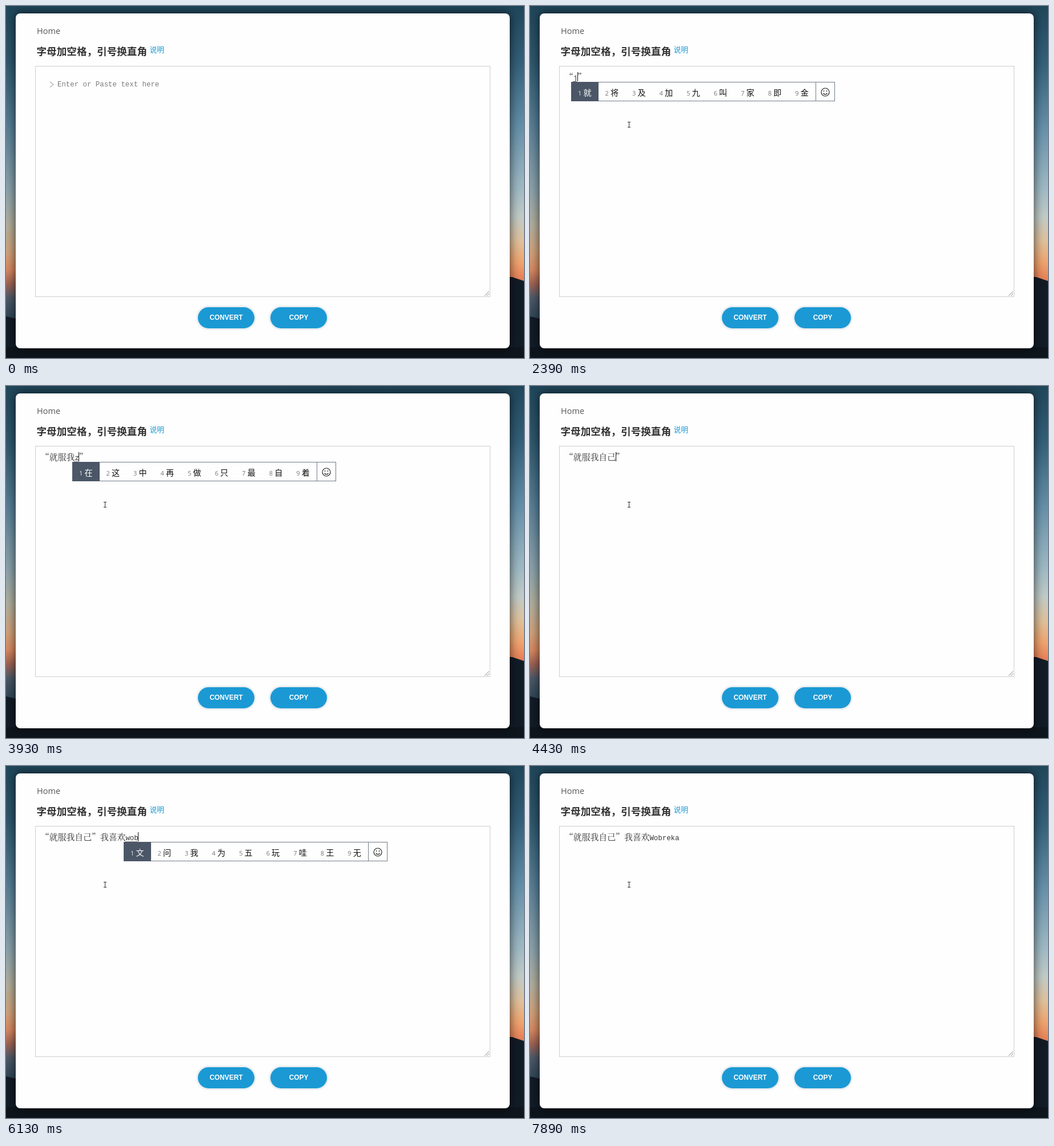
These frames come from a looping animation (907x617 px, 8000 ms). An HTML page:

```html
<!DOCTYPE html>
<html lang="zh-CN">
<head>
<meta charset="utf-8">
<title>Text converter</title>
<style>
  html, body { margin: 0; width: 100%; height: 100%; overflow: hidden; }
  body { position: relative; background: #0c1219; font-family: "Open Sans", "Noto Sans CJK SC", sans-serif; }
  #stage { position: absolute; left: 0; top: 0; width: 907px; height: 617px; overflow: hidden; }
  #stage > * { position: absolute; }
  #sky { left: 0; top: 0; }
  .card { left: 17px; top: 13px; width: 864.5px; height: 587px; border-radius: 8px; background: #fefefe; box-shadow: 0 0 18px rgba(0, 0, 0, .7); }
  .home { left: 54px; top: 34px; font-size: 14.5px; line-height: 20px; color: #555; }
  .title { left: 53.5px; top: 65.5px; font: bold 17.6px/25px "Noto Sans CJK SC", "Noto Sans CJK", sans-serif; color: #333; white-space: nowrap; }
  .note { left: 251.5px; top: 66px; font: 12.8px/20px "Noto Sans CJK SC", "Noto Sans CJK", sans-serif; color: #1c98d3; }
  .area { left: 51px; top: 105px; width: 795px; height: 403px; border: 1px solid #cecece; background: #fefefe; }
  .btn { top: 527.5px; width: 99px; height: 37px; border-radius: 19px; background: #1b99d4; color: #fff; text-align: center; font: bold 11.9px/37px "Liberation Sans", Arial, sans-serif; box-shadow: 0 0 0 2px #e6ecf0, 0 0 3px 2px #e0e4e8; }
  .latin { font: 12.38px/16px "Liberation Mono", "Courier New", monospace; }
  #hint { left: 90px; top: 130px; color: #7b7b7b; white-space: pre; }
  #line { left: 61px; top: 115.5px; height: 16px; color: #333; white-space: pre; font: 300 14.85px/16px "Noto Serif CJK SC", "Noto Sans CJK SC", "Noto Sans CJK", serif; }
  .comp { text-decoration: underline dotted 1px; text-underline-offset: 2px; }
  .caret { display: inline-block; position: relative; width: 0; height: 16px; vertical-align: top; }
  .caret::before { content: ""; position: absolute; left: -.5px; top: .5px; width: 1px; height: 16px; background: #111; }
  #bar { top: 133px; display: flex; height: 34px; box-sizing: border-box; background: #fefefe; box-shadow: inset 0 0 0 1px #747c88; white-space: nowrap; }
  #bar.tall { height: 54px; }
  .cell { height: 34px; padding: 0 12px; line-height: 37px; font-size: 14.1px; font-family: "Open Sans", "Noto Sans CJK SC", "Noto Sans CJK", sans-serif; color: #111; }
  .cell i { margin-right: 3.15px; font-style: normal; font-size: 11px; color: #777; }
  .cell:first-child { background: #4b5767; color: #fff; }
  .cell:first-child i { color: #dfe3e8; }
  .face { width: 34px; height: 34px; box-sizing: border-box; border-left: 1px solid #747c88; }
</style>
</head>
<body>
<div id="stage">
  <svg id="sky" width="907" height="617">
    <defs>
      <linearGradient id="west" x2="0" y2="1">
        <stop offset="0" stop-color="#20465a"/><stop offset=".16" stop-color="#30586e"/>
        <stop offset=".34" stop-color="#587f97"/><stop offset=".52" stop-color="#8ca4ad"/>
        <stop offset=".62" stop-color="#b3b0a0"/><stop offset=".7" stop-color="#d2a37c"/>
        <stop offset=".75" stop-color="#d98a62"/><stop offset=".79" stop-color="#9f6355"/>
        <stop offset=".83" stop-color="#4e5a69"/><stop offset=".88" stop-color="#34495a"/>
      </linearGradient>
      <linearGradient id="east" x2="0" y2="1">
        <stop offset="0" stop-color="#20465a"/><stop offset=".16" stop-color="#34607a"/>
        <stop offset=".34" stop-color="#648fa9"/><stop offset=".52" stop-color="#9fbac4"/>
        <stop offset=".6" stop-color="#c2cbc6"/><stop offset=".67" stop-color="#e0c09a"/>
        <stop offset=".73" stop-color="#f0a36e"/><stop offset=".78" stop-color="#e77d55"/>
      </linearGradient>
    </defs>
    <rect width="454" height="617" fill="url(#west)"/>
    <rect x="453" width="454" height="617" fill="url(#east)"/>
    <path d="M0 544L17 548L440 580L860 475L886 475L907 482V617H0Z" fill="#121c27"/>
    <rect y="598" width="907" height="19" fill="#0e151d"/>
  </svg>
  <div class="card"></div>
  <div class="home">Home</div>
  <div class="title">字母加空格，引号换直角</div>
  <div class="note">说明</div>
  <div class="area"></div>
  <svg style="left:836px;top:498px" width="11" height="11" stroke="#8a8a8a"><path d="M2 10L10 2M6 10L10 6"/></svg>
  <div class="btn" style="left:336px">CONVERT</div>
  <div class="btn" style="left:463px">COPY</div>
  <svg id="chevron" style="left:76px;top:131px" width="10" height="14" fill="none" stroke="#888"><path d="M1 1.5L7 6.5L1 11.5"/></svg>
  <div id="hint" class="latin">Enter or Paste text here</div>
  <div id="line"></div>
  <div id="bar"></div>
  <svg id="arrow" style="left:0;top:0" width="13" height="20"><path d="M.5 .5V16L4 12.8L6.5 18.5L9 17.4L6.6 12H11.5Z" fill="#fff" stroke="#222"/></svg>
  <svg id="beam" style="left:0;top:0" width="9" height="13" fill="none" stroke="#333"><path d="M2 1.5H7M4.5 1.5V10.5M2 10.5H7"/></svg>
</div>
<script>
const LOOP = 8000, EM = 14.85;
const $ = id => document.getElementById(id);
const show = (id, on) => { $(id).style.display = on ? '' : 'none'; };

const CANDS = {
  j: '就 将 及 加 九 叫 家 即 金',
  ji: '及 即 几 级 计 机 记 季 集',
  jiu: '就 九 久 酒 旧 救 究 舅 纠',
  f: '发 放 分 非 飞 风 服 副 负',
  fu: '服 付 福 父 副 负 服务 附近',
  w: '我 为 无 完 位 问 玩 外 王',
  wo: '我 握 窝 卧 沃 喔 涡 倭 蜗',
  z: '在 这 中 再 做 只 最 自 着',
  zi: '自 字 子 资 紫 姿 仔 滋 籽',
  zij: '自己 自家 字节 自觉 资金 自救 子集 字迹 字句',
  x: '下 想 系 小 新 先 学 写 像',
  xi: '系 西 喜 洗 细 戏 习 吸 息',
  xih: '喜欢 西湖 细化 洗好 稀罕 西汉 喜好 嬉话 系好',
  wob: '文 问 我 为 五 玩 哇 王 无',
  wobr: 'Wobrek 文 问 我 为 五 玩 哇 王',
  wobreka: 'Wobreka 文 问 我 为 五 玩 哇 王'
};

// time, text with "|" as caret and "[...]" as composition, candidate key
const STEPS = [
  [0, ''], [860, '|'], [1320, ''],
  [1600, '“|'], [1740, '“”|'], [2020, '“|”'],
  [2340, '“[j]|”'], [2390, '“[j]|”', 'j'], [2440, '“[ji]|”', 'ji'], [2580, '“[jiu]|”', 'jiu'],
  [2770, '“就|”'], [2950, '“就[f]|”', 'f'], [3050, '“就[fu]|”', 'fu'], [3460, '“就服|”'],
  [3600, '“就服[w]|”', 'w'], [3670, '“就服[wo]|”', 'wo'], [3810, '“就服我|”'],
  [3880, '“就服我[z]|”', 'z'], [3950, '“就服我[zi]|”', 'zi'],
  [4020, '“就服我[zij]|”', 'zij'], [4100, '“就服我[ziji]|”', 'zij'],
  [4430, '“就服我自己|”'], [4710, '“就服我自己”|'],
  [5230, '“就服我自己”[w]|'], [5280, '“就服我自己”[w]|', 'w'], [5340, '“就服我自己”[wo]|', 'wo'],
  [5470, '“就服我自己”我|'],
  [5610, '“就服我自己”我[x]|', 'x'], [5660, '“就服我自己”我[xi]|', 'xi'],
  [5720, '“就服我自己”我[xih]|', 'xih'], [5780, '“就服我自己”我[xihu]|', 'xih'],
  [5840, '“就服我自己”我喜欢|'],
  [6030, '“就服我自己”我喜欢[w]|', 'w'], [6080, '“就服我自己”我喜欢[wo]|', 'wob'],
  [6130, '“就服我自己”我喜欢[wob]|', 'wob'], [6270, '“就服我自己”我喜欢[wobr]|', 'wobr'],
  [6360, '“就服我自己”我喜欢[wobre]|', 'wobr'], [6500, '“就服我自己”我喜欢[wobrek]|', 'wobr'],
  [6870, '“就服我自己”我喜欢[wobreka]|', 'wobreka'],
  [7340, '“就服我自己”我喜欢Wobreka|'], [7890, '“就服我自己”我喜欢Wobreka']
];

// time, x, y of the pointer
const PATH = [[160, 475, 585], [310, 455, 540], [560, 290, 330], [760, 185, 220], [860, 174, 208]];

const FACE = '<svg class="face" fill="none" stroke="#222" stroke-width="1.2">' +
  '<circle cx="16" cy="18" r="7"/><path d="M12.5 20Q16 24 19.5 20"/>' +
  '<path d="M13.5 15V17M18.5 15V17"/></svg>';

function markup(text) {
  return text
    .replace(/(\[?)([A-Za-z]+)\]?/g, (all, open, word) =>
      `<span class="latin${open && ' comp'}">${word}</span>`)
    .replace('|', '<span class="caret"></span>');
}

let shown = null;
function showStep(step) {
  if (step === shown) return;
  shown = step;
  const [, text, key] = step;
  const empty = !text.replace('|', '');
  $('line').innerHTML = markup(text);
  show('hint', empty);
  show('chevron', empty);
  show('bar', key);
  if (!key) return;
  const bar = $('bar');
  bar.className = key === 'fu' ? 'tall' : '';
  bar.style.left = Math.round(61 + EM * text.indexOf('[') - 4) + 'px';
  bar.innerHTML = CANDS[key].split(' ')
    .map((c, i) => `<div class="cell"><i>${i + 1}</i>${c}</div>`).join('') + FACE;
}

function pointerAt(t) {
  const q = 160 + Math.floor((t - 160) / 50) * 50;
  const i = PATH.findIndex(p => p[0] > q);
  if (i < 0) return PATH[PATH.length - 1].slice(1);
  const [t0, x0, y0] = PATH[i - 1], [t1, x1, y1] = PATH[i];
  const k = (q - t0) / (t1 - t0);
  return [x0 + (x1 - x0) * k, y0 + (y1 - y0) * k];
}

function showPointer(t) {
  const visible = t >= 160;
  const [x, y] = visible ? pointerAt(t).map(Math.round) : [0, 0];
  const inArea = y < 509;
  show('arrow', visible && !inArea);
  show('beam', visible && inArea);
  $('arrow').style.transform = `translate(${x}px,${y}px)`;
  $('beam').style.transform = `translate(${x - 5}px,${y - 6}px)`;
}

function draw() {
  const t = performance.now() % LOOP;
  showStep(STEPS.filter(s => s[0] <= t).pop());
  showPointer(t);
  requestAnimationFrame(draw);
}
draw();
</script>
</body>
</html>
```
